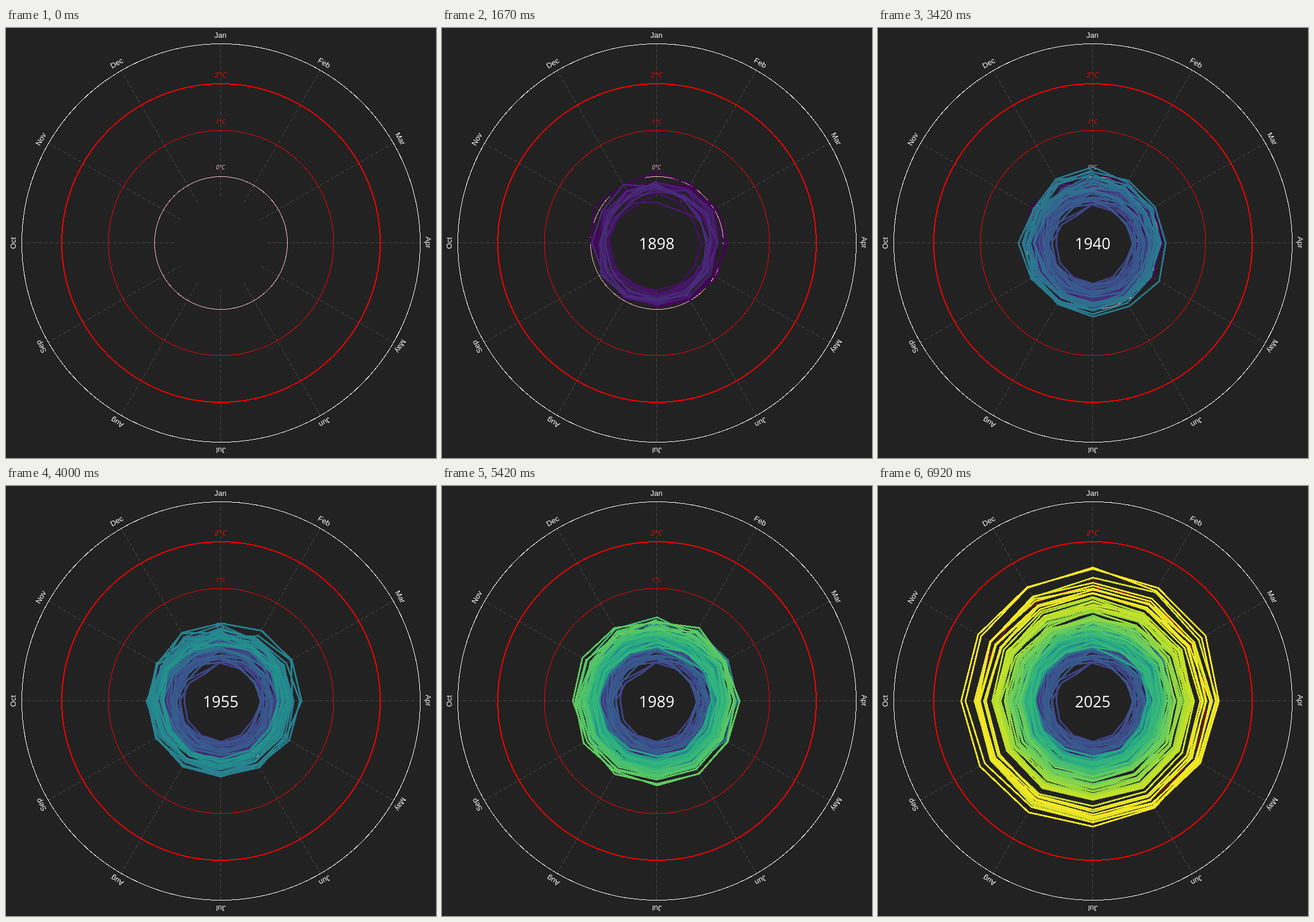
These frames come from a looping animation (748x748 px, 10000 ms). An HTML page:

```html
<!DOCTYPE html>
<html lang="en">
<head>
<meta charset="utf-8">
<title>Monthly temperature spiral</title>
<style>
  html, body { margin: 0; width: 100%; height: 100%; overflow: hidden; background: #222; }
  svg { display: block; width: 100vw; height: 100vh; }
  path, circle, line { fill: none; shape-rendering: crispEdges; }
  line { stroke: #484848; stroke-dasharray: 7 3; }
  path { stroke-width: 3; stroke-linejoin: round; }
  text { text-anchor: middle; }
  .month { font: 13px "Liberation Sans", Arial, sans-serif; fill: #fff; }
  .degree { font-family: "Open Sans", "Noto Sans", sans-serif; font-style: italic; }
  .year { font: 500 27px "Open Sans", "Noto Sans", sans-serif; fill: #fff; }
</style>
</head>
<body>
<svg id="stage" viewBox="0 0 748 748"></svg>
<script>
const FIRST = 1880, LAST = 2025, CENTER = 374;
const MONTHS = "Jan Feb Mar Apr May Jun Jul Aug Sep Oct Nov Dec".split(" ");
const VIRIDIS = ["#440154", "#482878", "#3e4989", "#31688e", "#26828e",
                 "#1f9e89", "#35b779", "#6ece58", "#b5de2b", "#fde725"];

// Turning points of the warming curve: year, degrees.
const TREND = [
  [1880, -0.14], [1882, -0.08], [1887, -0.32], [1900, -0.12], [1909, -0.46],
  [1917, -0.42], [1926, -0.2], [1938, -0.04], [1944, 0.18], [1950, -0.12],
  [1976, -0.04], [1990, 0.38], [1993, 0.24], [1998.4, 0.66], [2000, 0.4],
  [2007, 0.66], [2014, 0.7], [2016.1, 1.25], [2018, 0.85], [2020, 1.12],
  [2023, 0.9], [2023.7, 1.43], [2024.5, 1.2], [2025, 1.37], [2025.5, 1.05], [2026, 1.1]];

const svg = document.getElementById("stage");

function add(tag, attributes, text = "") {
  const node = document.createElementNS(svg.namespaceURI, tag);
  for (const name in attributes) node.setAttribute(name, attributes[name]);
  node.textContent = text;
  return svg.appendChild(node);
}

let seed = 41;
function noise() {
  seed = (seed * 16807) % 2147483647;
  return seed / 2147483647 * 2 - 1;
}

function trendAt(year) {
  const i = TREND.findIndex(([next]) => next > year);
  const [x0, y0] = TREND[i - 1], [x1, y1] = TREND[i];
  return y0 + (y1 - y0) * (year - x0) / (x1 - x0);
}

// Trend plus slow and fast drift; winters vary most and later years less.
function monthlyValues() {
  let slow = 0, fast = 0;
  return Array.from({ length: (LAST - FIRST + 1) * 12 }, (_, i) => {
    const progress = i / 12 / (LAST - FIRST + 1);
    const season = 0.17 + 0.08 * Math.cos(i * Math.PI / 6);
    slow = 0.93 * slow + 0.3 * noise();
    fast = 0.55 * fast + 0.7 * noise();
    const variation = 0.13 * slow + season * fast;
    return trendAt(FIRST + i / 12) + variation * (1 - 0.7 * progress ** 3);
  });
}

function yearColor(i) {
  const position = i / (LAST - FIRST) * (VIRIDIS.length - 1);
  const k = Math.min(Math.floor(position), VIRIDIS.length - 2);
  const channel = (color, c) => parseInt(color.slice(1 + 2 * c, 3 + 2 * c), 16);
  const mix = [0, 1, 2].map(c => {
    const from = channel(VIRIDIS[k], c), to = channel(VIRIDIS[k + 1], c);
    return Math.round(from + (to - from) * (position - k));
  });
  return `rgb(${mix})`;
}

function point(value, month) {
  const angle = month * Math.PI / 6, radius = 115.5 + 80.7 * value;
  const x = CENTER + radius * Math.sin(angle), y = CENTER - radius * Math.cos(angle);
  return x.toFixed(1) + " " + y.toFixed(1);
}

MONTHS.forEach((name, m) => {
  const transform = `rotate(${m * 30} 373.5 373.5)`;
  add("line", { x1: 373.5, x2: 373.5, y1: 293, y2: 27, transform });
  add("text", { class: "month", x: 373, y: 17, transform }, name);
});

function ring(r, stroke, width) {
  add("circle", { cx: CENTER, cy: CENTER, r, stroke, "stroke-width": width });
}
ring(346.5, "#fff", 1);
ring(277, "#f00", 2);
ring(196, "#f00", 1);
ring(115.5, "#ffc0cb", 1);

function degree(text, y, size, fill) {
  add("text", { class: "degree", x: 373, y, "font-size": size, fill }, text);
}
degree("2°C", 86, 13.5, "#f00");
degree("1°C", 167, 11, "#f00");
degree("0°C", 246, 10, "#ffc0cb");

// Each year's line runs on to the next January.
const values = monthlyValues();
const yearLines = Array.from({ length: LAST - FIRST + 1 }, (_, i) => {
  const points = values.slice(i * 12, i * 12 + 13).map(point);
  return add("path", { d: "M" + points.join("L"), stroke: yearColor(i) });
});
const yearLabel = add("text", { class: "year", x: 373.5, y: 385 });

let shown;
function draw(now) {
  const time = now % 10000;
  const step = Math.min(71, Math.floor((time - 996) * 12 / 1000));
  const year = step < 0 ? FIRST - 1 : 1881 + Math.ceil(step * 144 / 71);
  if (year === shown) return;
  shown = year;
  yearLines.forEach((line, i) =>
    line.style.display = FIRST + i <= year ? "" : "none");
  yearLabel.textContent = step < 0 ? "" : year;
}

const start = performance.now();
function tick() {
  draw(performance.now() - start);
  requestAnimationFrame(tick);
}
tick();
</script>
</body>
</html>
```
